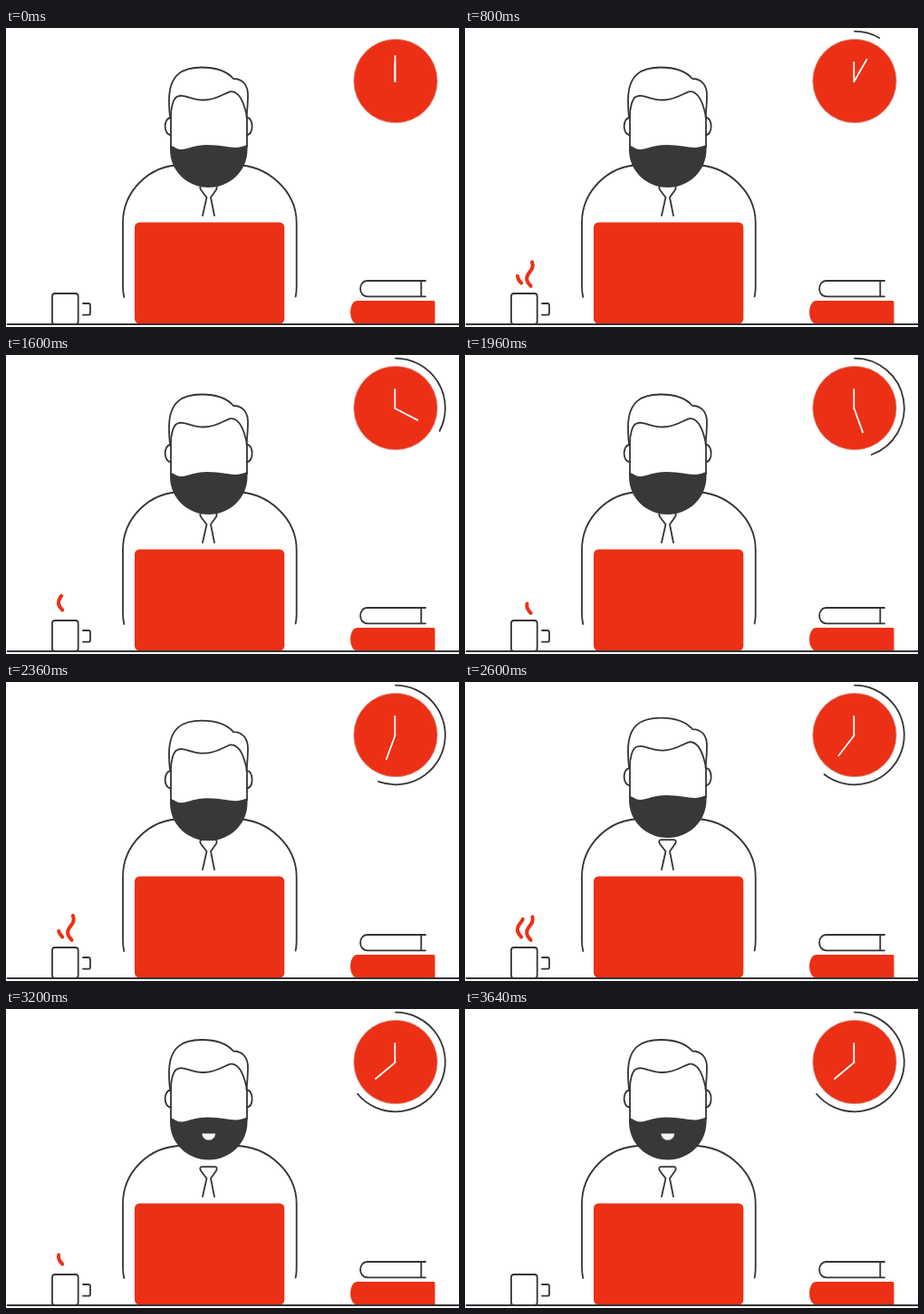
Recreate the animation shown at these times as an HTML page. Size 500 by 330 pixels, loop 4 s.

```html
<!DOCTYPE html>
<html lang="en">
<head>
<meta charset="utf-8">
<title>Working day</title>
<style>
  html, body { margin: 0; width: 100%; height: 100%; overflow: hidden; background: #fff; }
  svg { display: block; width: 100vw; height: 100vh; }
  .ink { fill: none; stroke: #353535; stroke-width: 1.8; stroke-linecap: round; stroke-linejoin: round; }
  .red { fill: #eb3015; }
  .steam { fill: none; stroke: #eb3015; stroke-width: 4; stroke-linecap: round; }
  .hand { fill: none; stroke: #fff; stroke-width: 1.8; stroke-linecap: round; }
</style>
</head>
<body>
<svg viewBox="0 0 500 330">
  <!-- clock -->
  <circle class="red" cx="430" cy="58.5" r="46.2" stroke="#dca79d" stroke-width=".8"/>
  <path id="hour" class="hand" d="M429.5 59V31"/>
  <path class="hand" d="M429.3 59V38"/>
  <path id="arc" class="ink"/>

  <!-- body -->
  <path class="ink" d="M130.3 297Q129 292 129 284V215C129 181 157 151 195 151"/>
  <path class="ink" d="M252 151C290 151 320.7 181 320.7 215V284Q320.7 292 319.6 296.5"/>
  <path class="ink" d="M217 207L221.5 187L215 178.5Q213 174.3 216.5 174.2H230.5Q234 174.3 232 178.5L226 187L230 207"/>

  <g id="head">
    <path class="ink" d="M182 99C173.500 99 173.500 118 182 118M266 99C273.500 99 273.500 118 266 118"/>
    <path class="ink" d="M182 131V97C182 88 184.500 79 188 76.300C196 71.500 203 79.500 218 79.500C232 79.500 239 73 247 70.300C256 69 261 79 264 90Q266 96 266 101V131"/>
    <path class="ink" d="M181.300 99C180 92 180 86 180 80C180 51 195 43.500 216 43.500C234 43.500 245 49 251 56C262 56 267 64 267 74C267 84 266 91 265.600 98"/>
    <path fill="#383838" d="M181 129.500C186 130.500 188 134 193 134C202 133.500 208 129 222 129C238 129 245 132 254 132C260 131.500 263 130 266.500 129V134C266.500 158 247 176 223.700 176S181 158 181 134Z"/>
    <path id="smile" fill="#f4f4f4" stroke="#a5a5a5" stroke-width=".6" d="M-7.200 0H7.200C7.200 9.500 -7.200 9.500 -7.200 0Z"/>
  </g>

  <rect class="red" x="142" y="214.500" width="165.300" height="112" rx="5.500"/>

  <!-- mug -->
  <rect class="ink" x="51" y="293" width="28.700" height="34" rx="3"/>
  <path class="ink" d="M85 304H91Q93 304 93 306V314.700Q93 316.700 91 316.700H85"/>
  <path id="left" class="steam" d="M62.300 281.500C57 276.500 57 271.500 60 267.500C63.500 263 66 260 63.500 254.500"/>
  <path id="right" class="steam" transform="translate(10.300 3.300)" d="M62.300 281.500C57 276.500 57 271.500 60 267.500C63.500 263 66 260 63.500 254.500"/>

  <!-- books -->
  <path class="ink" d="M463 279H399C388.500 279 388.500 296.300 399 296.300H463M458.300 279V296.300"/>
  <path class="red" d="M388 301H472Q473.500 301 473.500 302.500V326.500H388C377.500 326.500 377.500 301 388 301Z"/>

  <path class="ink" d="M1.500 327H500"/>
</svg>
<script>
const LOOP = 4000, STEP = 40;
const $ = id => document.getElementById(id);
const hour = $('hour'), arc = $('arc'), head = $('head'), smile = $('smile');
const wisps = [
  { el: $('left'), spans: [[540, 1260, 1300, 1980], [2120, 2840, 2860, 3440]] },
  { el: $('right'), spans: [[220, 860, 860, 1560], [1640, 2400, 2500, 3200]] }
];
for (const w of wisps) w.len = w.el.getTotalLength();

function ease(t, a, b) {
  const u = Math.min(1, Math.max(0, (t - a) / (b - a)));
  return u * u * (3 - 2 * u);
}

function drawClock(t) {
  const deg = 230 * ease(t, 160, 3000), rad = deg * Math.PI / 180, r = 54.8;
  hour.setAttribute('transform', `rotate(${deg} 429.5 59)`);
  const x = 430 + r * Math.sin(rad), y = 58.5 - r * Math.cos(rad);
  arc.setAttribute('d', deg > 0.3 ? `M430 ${58.5 - r}A${r} ${r} 0 ${deg > 180 ? 1 : 0} 1 ${x} ${y}` : '');
}

// Each wisp grows up from its base and sinks back.
function drawSteam(t) {
  for (const { el, spans, len } of wisps) {
    let grow = 0;
    for (const [a, b, c, d] of spans) grow += ease(t, a, b) - ease(t, c, d);
    el.style.display = grow > 0.004 ? '' : 'none';
    el.setAttribute('stroke-dasharray', `${grow * len} ${len * 2}`);
  }
}

function drawHead(t) {
  head.setAttribute('transform', `translate(0 ${-9.5 * ease(t, 2200, 3100)})`);
  const s = ease(t, 2640, 2900);
  smile.style.display = s > 0 ? '' : 'none';
  smile.setAttribute('transform', `translate(223.8 147) scale(${s})`);
}

function draw(ms) {
  const t = Math.floor((ms % LOOP) / STEP) * STEP;
  drawClock(t);
  drawSteam(t);
  drawHead(t);
}

const start = performance.now();
function tick() {
  draw(performance.now() - start);
  requestAnimationFrame(tick);
}
tick();
</script>
</body>
</html>
```
